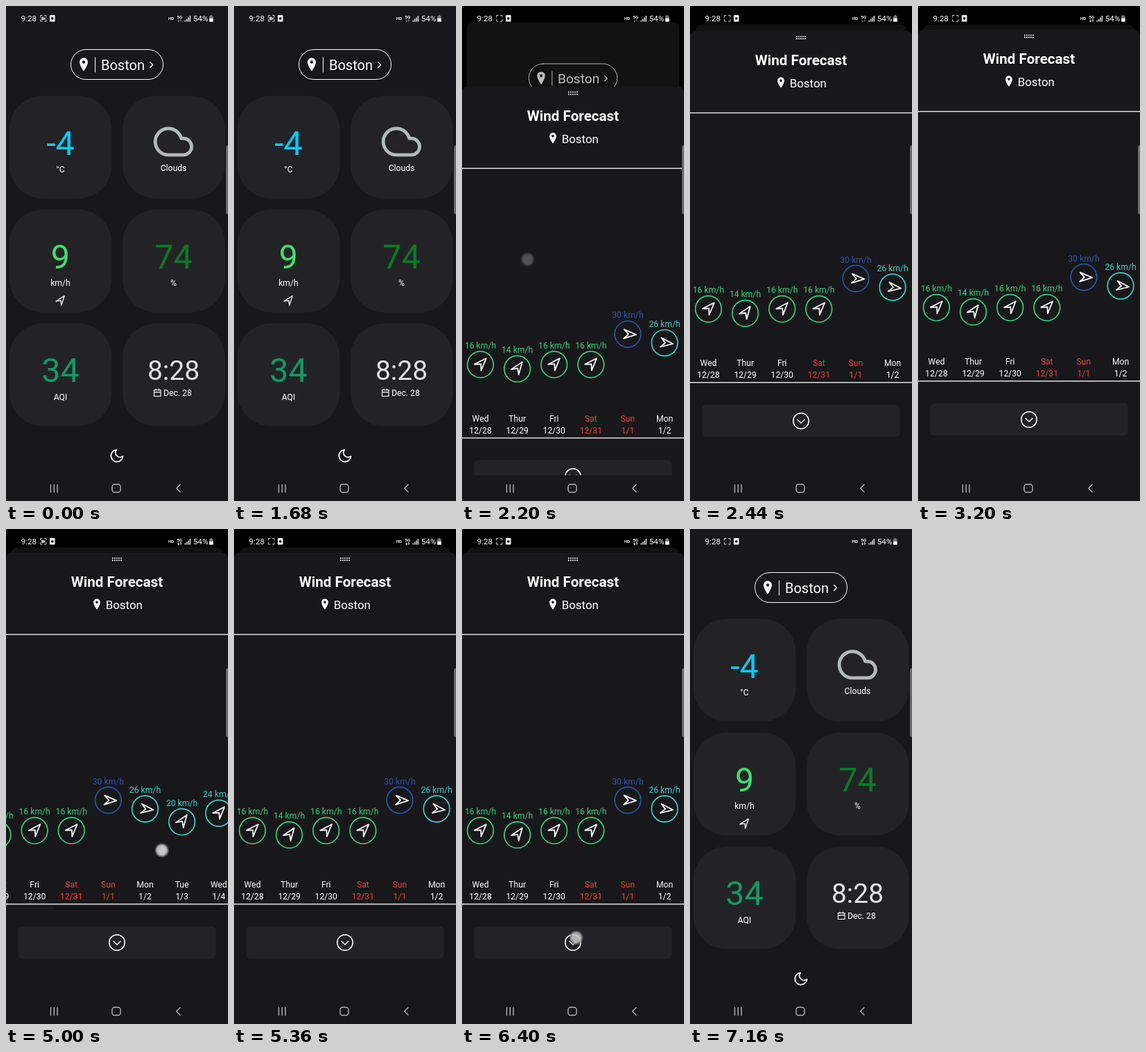
These frames come from a looping animation (320 by 711 pixels, 7.24 s). An HTML page:

```html
<!DOCTYPE html>
<html lang="en">
<head>
<meta charset="utf-8">
<title>Wind forecast</title>
<style>
html, body { margin: 0; width: 100%; height: 100%; overflow: hidden; background: #000; }
svg { display: block; width: 100vw; height: 100vh; font-family: Roboto, "Liberation Sans", sans-serif; }
text { fill: #fff; font-size: 12.2px; }
.mid { text-anchor: middle; }
.big { font-size: 48.5px; }
.line { fill: none; stroke: #fff; stroke-linecap: round; stroke-linejoin: round; }
</style>
</head>
<body>
<svg viewBox="0 0 320 711" preserveAspectRatio="none">
  <defs>
    <path id="pin" fill-rule="evenodd" d="M0 9.5C-3 5.5-6-.5-6-3.5a6 6 0 0 1 12 0C6-.5 3 5.5 0 9.5zM0-5.7a2.2 2.2 0 1 0 0 4.4a2.2 2.2 0 1 0 0-4.4z"/>
    <path id="arrow" class="line" stroke-width="1.75" d="M8.6-8.6-8.6-.7H.7V8.6z"/>
    <radialGradient id="glow">
      <stop offset="0" stop-color="#cacaca"/>
      <stop offset=".55" stop-color="#c2c2c2"/>
      <stop offset=".72" stop-color="#969696"/>
      <stop offset=".84" stop-color="#777" stop-opacity=".6"/>
      <stop offset="1" stop-color="#666" stop-opacity="0"/>
    </radialGradient>
  </defs>

  <rect width="320" height="711" fill="#000"/>

  <g id="home">
    <rect id="page" width="320" height="674" fill="#18181a"/>
    <rect class="line" x="93.5" y="62.5" width="133" height="43" rx="21.5" stroke="#ddd"/>
    <use href="#pin" x="112" y="84" fill="#fff"/>
    <path class="line" d="M128.5 74V95"/>
    <text x="137" y="92" style="font-size:20px">Boston</text>
    <path class="line" stroke-width="1.3" d="M207.5 80.5l4 4-4 4"/>
    <g id="cards"></g>

    <text class="mid big" x="78.5" y="214" style="fill:#00ccff">-4</text>
    <text class="mid" x="78.5" y="239">°C</text>
    <path class="line" transform="translate(212.8 166.3) scale(2.38)" stroke-width="2" style="stroke:#b2babc"
      d="M18 10h-1.26A8 8 0 1 0 9 20h9a5 5 0 0 0 0-10z"/>
    <text class="mid" x="241.5" y="237">Clouds</text>
    <text class="mid big" x="78.5" y="377" style="fill:#3fe070">9</text>
    <text class="mid" x="78.5" y="402">km/h</text>
    <use href="#arrow" transform="translate(78.5 423.7) rotate(-7) scale(.76)"/>
    <text class="mid big" x="241.5" y="377" style="fill:#0b7a26">74</text>
    <text class="mid" x="241.5" y="402">%</text>
    <text class="mid big" x="78.5" y="540" style="fill:#0f9a66">34</text>
    <text class="mid" x="78.5" y="566">AQI</text>
    <text class="mid" x="241.5" y="537" style="font-size:39px;fill:#e2e2e4">8:28</text>
    <path class="line" stroke-width="1.1" d="M213.5 551.5h9.5v9h-9.5zM213.5 554.6h9.5M216 550v2M220.5 550v2"/>
    <text x="227" y="560">Dec. 28</text>
    <path class="line" transform="translate(148.4 634.5) scale(.96)" stroke-width="1.9"
      d="M21 12.79A9 9 0 1 1 11.21 3 7 7 0 0 0 21 12.79z"/>
  </g>
  <rect id="shade" width="320" height="674" fill="#000" opacity="0"/>

  <g id="sheet">
    <path d="M0 674V42a8 8 0 0 1 8-8H312a8 8 0 0 1 8 8V674z" fill="#18181a"/>
    <path d="M153 41.9h14.5M153 45h14.5" stroke="#ddd" stroke-width="1.8" stroke-dasharray="1.8 1.2"/>
    <text class="mid" x="160" y="82.8" style="font-size:20.6px;font-weight:700">Wind Forecast</text>
    <use href="#pin" transform="translate(131 108) scale(.82)" fill="#fff"/>
    <text x="143.7" y="114.8" style="font-size:16.9px">Boston</text>
    <path d="M0 151.5H320M0 538.8H320" stroke="#e0e0e0" stroke-width="1.5"/>
    <g id="days"></g>
    <rect id="bar" y="543.5" width="240" height="3" fill="#000" opacity="0"/>
    <rect x="17.5" y="570.5" width="285" height="46.5" rx="6" fill="#232325"/>
    <circle class="line" cx="160" cy="594" r="11.2" stroke-width="1.5"/>
    <path class="line" stroke-width="1.5" d="M155 592.2l5 4.8 5-4.8"/>
  </g>

  <circle id="dot" r="11" fill="url(#glow)" opacity="0"/>

  <rect y="674" width="320" height="37" fill="#18181a"/>
  <g class="line" style="stroke:#b4b4b6" stroke-width="1.4">
    <path d="M64.5 687.5v11M69.3 687.5v11M74.1 687.5v11M251 687.5l-5.3 5.3 5.3 5.3"/>
    <rect x="153" y="687" width="12" height="11.5" rx="3.6"/>
  </g>
  <rect x="317" y="200" width="6" height="99" rx="2.5" fill="#6a6a6c"/>

  <g id="status">
    <text x="21.5" y="21.8" style="font-size:11.7px">9:28</text>
    <path class="line" stroke-width="1" style="stroke:#ccc" d="M49.5 16v-2.5h2.5M55.5 13.5h2.5V16M58 19.5V22h-2.5M52 22h-2.5v-2.5"/>
    <path id="rec" d="M51 15.8h4v1.2l1.6-.9v3.8l-1.6-.9v1.2h-4z" fill="#bbb"/>
    <rect x="63" y="13" width="7.6" height="9.6" rx="1.3" fill="#f2f2f2"/>
    <circle cx="66.8" cy="17.8" r="1.9" fill="#222"/>
    <text x="234" y="20" style="font-size:6px;font-weight:700">HD</text>
    <text x="246.5" y="18" style="font-size:6.2px;font-weight:700">5G</text>
    <path id="data" class="line" stroke-width=".9" d="M248.6 19.5v3.2m-1-1l1 1 1-1M251.9 22.7v-3.2m-1 1l1-1 1 1"/>
    <path d="M258.2 22.5v-2M260.6 22.5v-4M263 22.5v-6M265.4 22.5v-8.5" stroke="#e4e4e4" stroke-width="1.5"/>
    <text x="269.8" y="21.8" style="font-size:11.7px">54%</text>
    <path d="M293 14.3h1.6V13h2.4v1.3h1.6v8.2H293z" fill="#777"/>
    <path d="M293 17.8h5.6v4.7H293z" fill="#fff"/>
  </g>
</svg>

<script>
const LOOP = 7240, OPEN = 2004, CLOSE = 6720;
const TRAVEL = 640, STEP = 53.1, MAX_SCROLL = 8 * STEP - 320;
const SWIPE = 360, SWIPE_LEFT = 3700, SWIPE_RIGHT = 4920;
const $ = id => document.getElementById(id);
const set = (id, attrs) => { for (const k in attrs) $(id).setAttribute(k, attrs[k]); };
const clamp = v => Math.min(1, Math.max(0, v));
const ramp = (t, a, b) => clamp((t - a) / (b - a));
const smooth = u => u * u * (3 - 2 * u);
const swipe = (t, start) => smooth(ramp(t, start, start + SWIPE));

$('cards').innerHTML = [129, 292.5, 456].map(y => [5, 168].map(x =>
  `<rect x="${x}" y="${y}" width="147.5" height="147.5" rx="48" fill="#232325"/>`).join('')).join('');

// day, date, speed, arrow turn
const forecast = [
  ['Wed', '12/28', 16, -2], ['Thur', '12/29', 14, -9], ['Fri', '12/30', 16, -3], ['Sat', '12/31', 16, -2],
  ['Sun', '1/1', 30, 48], ['Mon', '1/2', 26, 52], ['Tue', '1/3', 20, -9], ['Wed', '1/4', 24, -3]
];
const windColor = v => v < 18 ? '#32d286' : v < 28 ? '#38d2ca' : '#2a55a6';

$('days').innerHTML = forecast.map(([day, date, speed, turn], i) => {
  const x = STEP * (i + .5), y = 433.2 - (speed - 16) * 3.12;
  const ink = day[0] === 'S' ? '#f23c3c' : '#fff', tone = windColor(speed);
  return `<text class="mid" x="${x}" y="${y - 23}" style="fill:${tone}">${speed} km/h</text>
    <circle class="line" cx="${x}" cy="${y}" r="18.8" stroke-width="1.7" style="stroke:${tone}"/>
    <use href="#arrow" transform="translate(${x} ${y}) rotate(${turn})"/>
    <text class="mid" x="${x}" y="515" style="fill:${ink}">${day}</text>
    <text class="mid" x="${x}" y="531.8" style="fill:${ink}">${date}</text>`;
}).join('');

// Critically damped spring, 0 to 1
function spring(ms) {
  const w = 18.26 * Math.max(0, ms) / 1000;
  return w > 12 ? 1 : 1 - Math.exp(-w) * (1 + w);
}

// down, release, gone, x, y, drag distance, drag start
const touches = [
  [1710, 1960, 2320, 94.5, 364, 0, 0],
  [3680, 4020, 4220, 250, 461.5, -140, SWIPE_LEFT],
  [4900, 5240, 5440, 207, 461.5, 140, SWIPE_RIGHT],
  [6365, 6640, 6960, 164.5, 587, 0, 0]
];

function drawTouch(t) {
  const hit = touches.find(([down, , gone]) => t >= down && t < gone);
  if (!hit) return set('dot', { opacity: 0 });
  const [down, up, gone, x, y, dist, start] = hit;
  set('dot', {
    cx: x + dist * swipe(t, start), cy: y,
    opacity: ramp(t, down, down + 40) * (1 - ramp(t, up, gone))
  });
}

function draw(t) {
  const p = t < CLOSE ? spring(t - OPEN) : 1 - spring(t - CLOSE);
  const scale = 1 - .049 * p;
  set('home', { transform: `translate(160 ${337 + 10 * p}) scale(${scale}) translate(-160 -337)` });
  set('page', { rx: 9 * clamp(p * 4) });
  set('shade', { opacity: .3 * p });
  set('sheet', { transform: `translate(0 ${TRAVEL * (1 - p)})` });

  const scroll = MAX_SCROLL * (swipe(t, SWIPE_LEFT) - swipe(t, SWIPE_RIGHT));
  set('days', { transform: `translate(${-scroll} 0)` });
  const bar = ramp(t, 3700, 3740) * (1 - ramp(t, 4400, 4640)) + ramp(t, 4920, 4960) * (1 - ramp(t, 5320, 5520));
  set('bar', { x: scroll * 320 / (8 * STEP), opacity: .35 * bar });

  drawTouch(t);
  const blinks = Math.floor((t + 312) / 497.5);
  set('rec', { opacity: blinks % 2 ? 0 : 1 });
  set('data', { opacity: t < 3200 ? .45 : 1 });
}

let begin;
function tick(now) {
  begin ??= now;
  draw((now - begin) % LOOP);
  requestAnimationFrame(tick);
}
draw(0);
requestAnimationFrame(tick);
</script>
</body>
</html>
```
